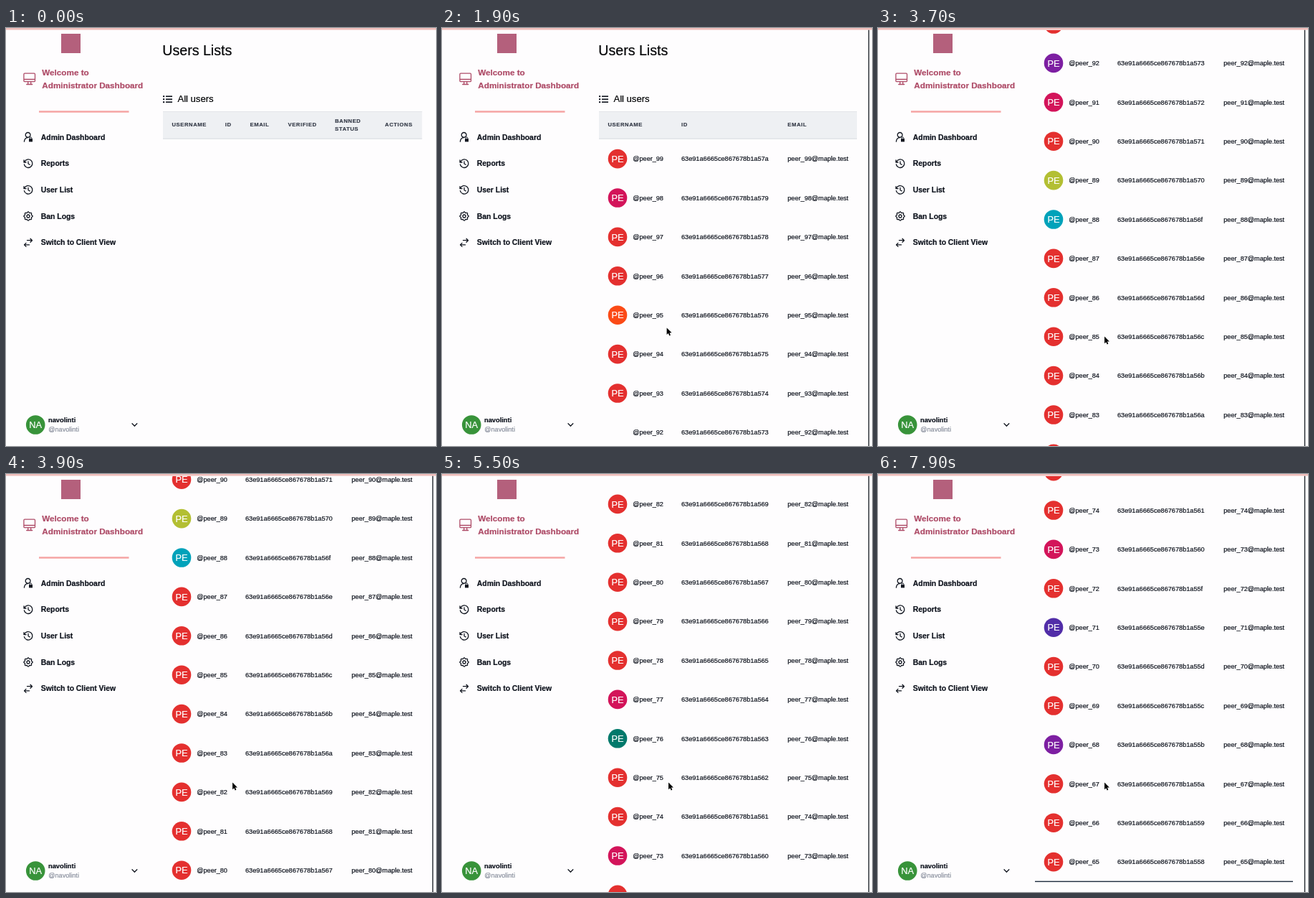
Animation, 600 px wide and 582 px high, one loop 8 s. Source, as an HTML page with a canvas:

```html
<!DOCTYPE html>
<html lang="en">
<head>
<meta charset="utf-8">
<title>Users Lists</title>
<style>
  html, body { margin: 0; width: 100%; height: 100%; overflow: hidden; background: #fefdfe; }
  canvas { display: block; width: 600px; height: 582px; }
</style>
</head>
<body>
<canvas id="stage"></canvas>
<script>
const W = 600, H = 582, LOOP = 8000, STEP = 100;
const canvas = document.getElementById('stage');
const ctx = canvas.getContext('2d');
const ratio = window.devicePixelRatio || 1;
canvas.width = W * ratio;
canvas.height = H * ratio;

const SANS = '"Liberation Sans", Arial, sans-serif';
const INK = '#10151f', ROSE = '#ae4c68', RED = '#e4302f', PINK = '#d3145a', PURPLE = '#7d1fa2';
const LOADED = 1700, ROW_TOP = 182.1, ROW_GAP = 54.4, FIRST = 99, LAST = 65;
const AVATARS = {
  98: PINK, 95: '#fb4a16', 92: PURPLE, 91: PINK, 89: '#b3bf33', 88: '#00a2ba',
  77: PINK, 76: '#00796b', 73: PINK, 71: '#512da8', 68: PURPLE
};

// Keys are [ms, value...]
const SCROLL = [
  [3300, 0], [3400, 40], [3500, 180], [3600, 360], [3700, 514], [3800, 610], [3900, 664],
  [4000, 694], [4200, 717], [4800, 717], [4900, 721], [5000, 730], [5200, 900], [5300, 985],
  [5500, 1065], [6300, 1065], [6400, 1075], [6600, 1151.6], [6800, 1360], [6900, 1440],
  [7000, 1478], [7100, 1491.6]
];
const POINTER = [
  [100, 572, 524], [600, 487, 480], [700, 487, 480], [1300, 350, 432], [1900, 313.6, 417.5],
  [3300, 315, 425.8], [3700, 316, 429.6]
];

function sample(keys, t) {
  if (t <= keys[0][0]) return keys[0].slice(1);
  for (let i = 1; i < keys.length; i++) {
    const a = keys[i - 1], b = keys[i];
    if (t <= b[0]) {
      const k = (t - a[0]) / (b[0] - a[0]);
      return a.slice(1).map((v, j) => v + (b[j + 1] - v) * k);
    }
  }
  return keys[keys.length - 1].slice(1);
}

// A hairline stroke gives the slightly heavy look of smoothed type
function text(str, x, y, size, color = INK, weight = 400, align = 'left', spacing = 0) {
  ctx.font = `${weight} ${size}px ${SANS}`;
  ctx.letterSpacing = spacing + 'px';
  ctx.textAlign = align;
  ctx.fillStyle = ctx.strokeStyle = color;
  ctx.lineWidth = 0.22;
  ctx.fillText(str, x, y);
  ctx.strokeText(str, x, y);
}

function rect(x, y, w, h, color) {
  ctx.fillStyle = color;
  ctx.fillRect(x, y, w, h);
}

function stroke(path, color = INK, width = 1.3) {
  ctx.strokeStyle = color;
  ctx.lineWidth = width;
  ctx.lineCap = ctx.lineJoin = 'round';
  ctx.stroke(new Path2D(path));
}

function at(x, y, draw) {
  ctx.save();
  ctx.translate(x, y);
  draw();
  ctx.restore();
}

function avatar(x, y, color, initials) {
  ctx.fillStyle = color;
  ctx.beginPath();
  ctx.arc(x, y, 13.3, 0, Math.PI * 2);
  ctx.fill();
  text(initials, x, y + 4.6, 12.8, '#fff', 400, 'center');
}

function adminIcon() {
  stroke('M3 -3A3.4 3.4 0 1 1 -3.8 -3A3.4 3.4 0 1 1 3 -3M-5.6 6.2C-5.2 2.8 -3.2 .8 -.4 .7');
  rect(1, 2.2, 5, 4.3, INK);
  stroke('M2.2 2.2V1.4A1.3 1.3 0 0 1 4.8 1.4V2.2', INK, 1);
}

function historyIcon() {
  stroke('M-5.3 -2.2A5.8 5.8 0 1 1 -5.6 1.4M-6 -4.6V-1.6H-3M0 -2.8V.4L2.2 1.6', INK, 1.3);
}

function gearIcon() {
  let d = '';
  for (let i = 0; i <= 64; i++) {
    const a = i / 64 * Math.PI * 2;
    const r = 5.5 + 0.65 * Math.cos(a * 8);
    d += `${i ? 'L' : 'M'}${r * Math.cos(a)} ${r * Math.sin(a)}`;
  }
  stroke(d + 'Z', INK, 1.3);
  stroke('M2 0A2 2 0 1 1 -2 0A2 2 0 1 1 2 0', INK, 1.3);
}

function swapIcon() {
  stroke('M-1.5 -3H5.5M3 -5.5L5.5 -3L3 -.5M1.5 3.2H-5.5M-3 .7L-5.5 3.2L-3 5.7', INK, 1.3);
}

const MENU = [
  ['Admin Dashboard', adminIcon], ['Reports', historyIcon], ['User List', historyIcon],
  ['Ban Logs', gearIcon], ['Switch to Client View', swapIcon]
];

function sidebar() {
  rect(77, 8, 27, 27, '#b4607c');
  at(32.7, 70.5, () => stroke(
    'M-6.6 -7.3H6.6Q7.8 -7.3 7.8 -6.1V3Q7.8 4.2 6.6 4.2H-6.6Q-7.8 4.2 -7.8 3V-6.1Q-7.8 -7.3 -6.6 -7.3Z' +
    'M-7.8 1H7.8M-2 4.2V7.8M2 4.2V7.8M-4 8H4', ROSE));
  text('Welcome to', 50.3, 65.6, 11.7, ROSE, 700);
  text('Administrator Dashboard', 50.3, 83.8, 11.7, ROSE, 700);
  rect(46, 115.3, 125.5, 2.4, '#f6a2a2');
  MENU.forEach(([label, icon], i) => {
    const y = 151.9 + i * 36.7;
    at(31, y, icon);
    text(label, 48.8, y + 3.7, 10.4, INK, 700);
  });
  avatar(41.2, 552.5, '#38933a', 'NA');
  text('navolinti', 59, 549.2, 9.3, INK, 700);
  text('@navolinti', 59.3, 562.3, 9.1, '#8a909e');
  stroke('M176 550.8L179.4 554.2L182.8 550.8', INK, 1.3);
}

function tableHead(loaded) {
  const w = loaded ? 360 : 361.5;
  rect(219, 116, w, 38.6, '#eef0f3');
  rect(219, 116, w, 1, '#e3e5e9');
  rect(219, 153.6, w, 1, '#d9dce1');
  const head = (str, x, y = 137.3) => text(str, x, y, 7.6, '#383e4b', 700, 'left', 0.62);
  head('USERNAME', 231.5);
  if (loaded) {
    head('ID', 334);
    head('EMAIL', 482.3);
    return;
  }
  head('ID', 305.8);
  head('EMAIL', 340.5);
  head('VERIFIED', 393.5);
  head('BANNED', 459, 132.2);
  head('STATUS', 459, 142.9);
  head('ACTIONS', 528.8);
}

function rows(t, scroll) {
  for (let n = FIRST; n >= LAST; n--) {
    const i = FIRST - n, y = ROW_TOP + i * ROW_GAP;
    if (y - scroll < -20 || y - scroll > H + 20) continue;
    if (n !== 92 || t >= 2000) avatar(245, y, AVATARS[n] || RED, 'PE');
    const id = '63e91a6665ce867678b1a' + (0x57a - i).toString(16);
    text('@peer_' + n, 266.3, y + 3.3, 9.1);
    text(id, 334, y + 3.3, 9.17);
    text(`peer_${n}@maple.test`, 482.3, y + 3.3, 9.14);
  }
  rect(219, ROW_TOP + (FIRST - LAST + 0.5) * ROW_GAP - 0.6, 360, 1.4, '#1d2b3d');
}

function content(t) {
  const loaded = t >= LOADED;
  const [scroll] = sample(SCROLL, t);
  ctx.save();
  ctx.beginPath();
  ctx.rect(205, 3, W - 205, H - 3);
  ctx.clip();
  ctx.translate(0, -scroll);
  text('Users Lists', 218.3, 37.6, 19.6, '#050608');
  for (let i = 0; i < 3; i++) {
    const y = 94.2 + i * 4;
    rect(219, y, 2.2, 2, INK);
    rect(223, y + 0.2, 9, 1.6, INK);
  }
  text('All users', 239.4, 103.1, 13.1, '#050608');
  tableHead(loaded);
  if (loaded) rows(t, scroll);
  ctx.restore();
  if (loaded) rect(594.8, 2.5, 1.4, H, '#20252c');
}

function pointer(t) {
  if (t < POINTER[0][0]) return;
  const [x, y] = sample(POINTER, t);
  at(x, y, () => {
    const arrow = 'M0 0V9.6L2.2 7.6L3.7 10.9L5.3 10.2L3.9 7L6.9 6.8Z';
    stroke(arrow, '#fff', 1.4);
    ctx.fillStyle = '#000';
    ctx.fill(new Path2D(arrow));
  });
}

function draw(now) {
  const t = Math.floor(now % LOOP / STEP) * STEP;
  ctx.setTransform(ratio, 0, 0, ratio, 0, 0);
  rect(0, 0, W, H, '#fefdfe');
  content(t);
  sidebar();
  rect(0, 0, W, 2.6, '#f0bfbc');
  pointer(t);
}

let start;
function tick(now) {
  if (start === undefined) start = now;
  draw(now - start);
  requestAnimationFrame(tick);
}
draw(0);
requestAnimationFrame(tick);
</script>
</body>
</html>
```
